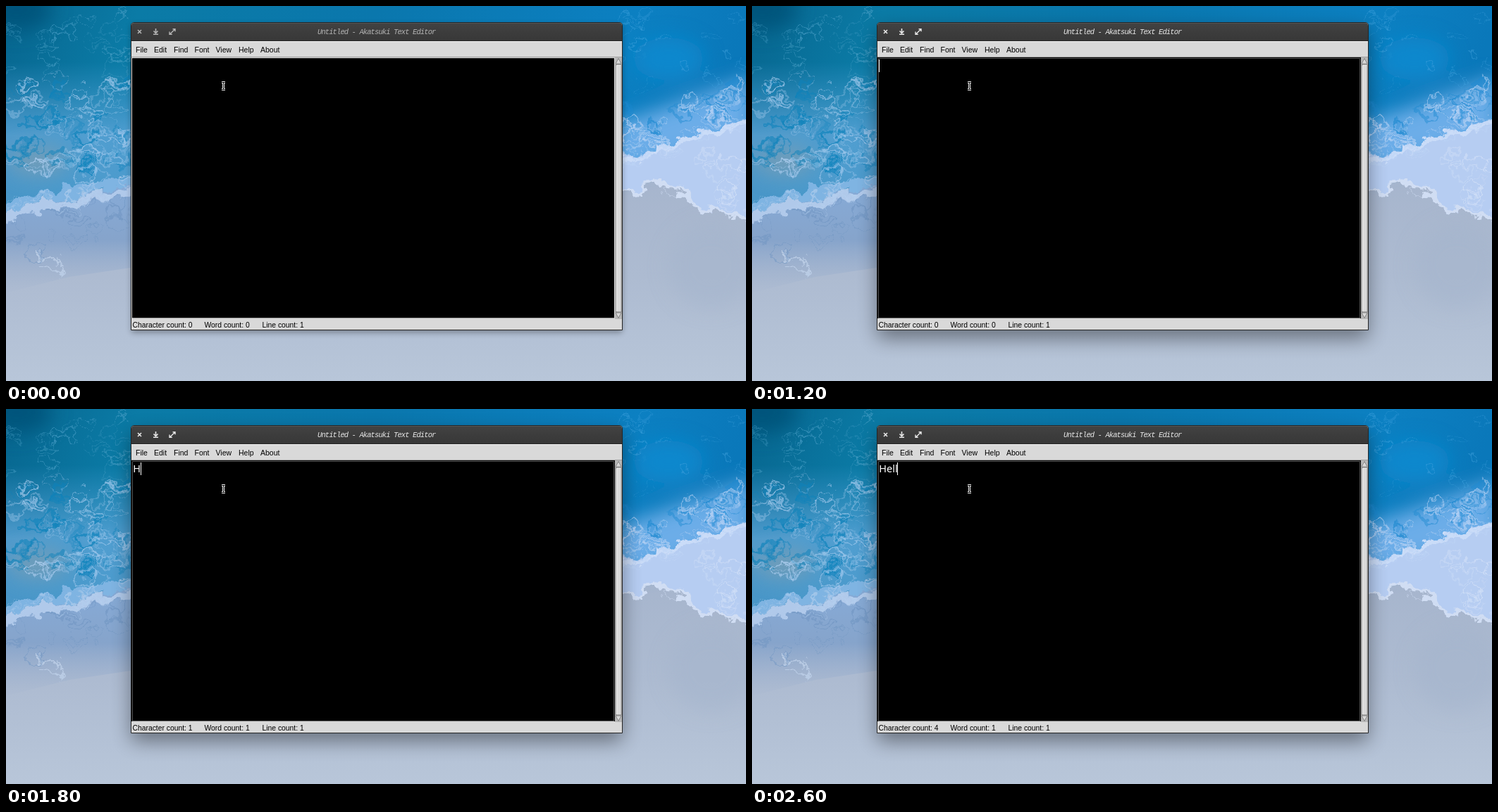
Recreate the animation shown at these times as an HTML page. Size 1050 px wide and 533 px high, loop 8 s.

```html
<!DOCTYPE html>
<html lang="en">
<head>
<meta charset="utf-8">
<title>Text editor</title>
<style>
  html, body { margin: 0; width: 100%; height: 100%; overflow: hidden; }
  svg { position: absolute; inset: 0; width: 100%; height: 100%; }
  .ui { font: 10.5px "Liberation Sans", sans-serif; white-space: pre; }
  #status { font-size: 10.35px; }
  #title { font: italic 10.5px "Liberation Mono", monospace; letter-spacing: -.9px; }
  #typed { font: 14.5px "Noto Sans", sans-serif; fill: #fff; }
  #chrome { --ink: #b4b4b4; --focus: #d9d9d9; --inset: #000; }
  #chrome.active { --ink: #e8e8e8; --focus: #000; --inset: #777; }
  #title { fill: var(--ink); }
  #icons { stroke: var(--ink); fill: none; stroke-width: 1.6; }
  #shadow { opacity: .35; }
  .active #shadow { opacity: .42; }
</style>
</head>
<body>

<!-- Beach seen from above -->
<svg viewBox="0 0 1050 533" preserveAspectRatio="none">
  <defs>
    <linearGradient id="sand" x2="0" y2="1">
      <stop offset=".45" stop-color="#a6b5cd"/>
      <stop offset=".72" stop-color="#adbbd1"/>
      <stop offset="1" stop-color="#b8c6d9"/>
    </linearGradient>
    <linearGradient id="sea" x2="1" y2=".1">
      <stop offset="0" stop-color="#07668f"/>
      <stop offset=".18" stop-color="#0b7ba6"/>
      <stop offset=".5" stop-color="#0a77ad"/>
      <stop offset=".85" stop-color="#0c80c2"/>
      <stop offset="1" stop-color="#0a78ba"/>
    </linearGradient>
    <linearGradient id="wet" x2="0" y2="1">
      <stop offset="0" stop-color="#86abd8"/>
      <stop offset=".5" stop-color="#86a4cb"/>
      <stop offset="1" stop-color="#a5b5cf" stop-opacity="0"/>
    </linearGradient>
    <linearGradient id="surf" x2="0" y2="1">
      <stop offset="0" stop-color="#5ba6e0" stop-opacity="0"/>
      <stop offset=".5" stop-color="#68aade" stop-opacity=".75"/>
      <stop offset="1" stop-color="#6aa9de" stop-opacity=".65"/>
    </linearGradient>
    <filter id="soft" x="-30%" y="-30%" width="160%" height="160%">
      <feGaussianBlur stdDeviation="14"/>
    </filter>
    <filter id="ragged" filterUnits="userSpaceOnUse" x="-40" y="-40" width="1130" height="613"
            color-interpolation-filters="sRGB">
      <feTurbulence type="fractalNoise" baseFrequency=".045" numOctaves="4" seed="4"/>
      <feDisplacementMap in="SourceGraphic" scale="34" xChannelSelector="R" yChannelSelector="G"/>
      <feGaussianBlur stdDeviation=".6"/>
    </filter>
  </defs>
  <rect width="1050" height="533" fill="url(#sand)"/>
  <path d="M-30 280L190 250V370L90 385L-30 415Z" fill="url(#wet)"/>
  <path d="M0 0H1050V170L875 230H178V250L0 288Z" fill="url(#sea)"/>
  <path d="M0 80H178V250L0 288Z" fill="url(#surf)"/>
  <g filter="url(#soft)">
    <ellipse cx="15" cy="5" rx="50" ry="30" fill="#06557c"/>
    <ellipse cx="45" cy="220" rx="42" ry="20" fill="#719db9"/>
    <ellipse cx="940" cy="75" rx="50" ry="30" fill="#1088cd"/>
    <path d="M860 170L1060 100V190L860 240Z" fill="#6cade8"/>
    <ellipse cx="1000" cy="370" rx="60" ry="60" fill="#a3b3cb" opacity=".5"/>
  </g>
  <g filter="url(#ragged)">
    <path d="M860 220L940 195L1065 155V308L1010 296L985 288L937 253L860 270Z" fill="#b6cdf2"/>
    <path d="M870 225Q950 190 1060 163" fill="none" stroke="#cadcf8" stroke-width="7"/>
    <path d="M870 268L937 251L986 287L1060 306" fill="none" stroke="#d0ddf3" stroke-width="5"/>
    <path d="M-20 309Q60 275 190 264" fill="none" stroke="#b0c9ea" stroke-width="12"/>
    <path d="M-20 295Q70 262 190 247" fill="none" stroke="#7fb4e2" stroke-width="12"/>
    <path d="M45 355Q85 360 78 387M48 371Q65 367 78 387" fill="none" stroke="#b9cbe4" stroke-width="2"/>
    <g id="foam" fill="none"/>
  </g>
</svg>

<!-- Editor window -->
<svg id="chrome" viewBox="0 0 1050 533" preserveAspectRatio="none">
  <defs>
    <linearGradient id="bar" x2="0" y2="1">
      <stop stop-color="#424242"/><stop offset="1" stop-color="#373737"/>
    </linearGradient>
    <filter id="blur" filterUnits="userSpaceOnUse" x="100" y="-40" width="860" height="580">
      <feGaussianBlur id="spread" stdDeviation="4"/>
    </filter>
  </defs>
  <g id="shadow" filter="url(#blur)"><rect id="shade" x="178" y="24" width="696" height="437"/></g>
  <path d="M177.500 460.500V28q0-4.500 4.500-4.500H870q4.500 0 4.500 4.500V460.500Z" fill="#d9d9d9" stroke="#252525"/>
  <path d="M178 50V28q0-4 4-4H870q4 0 4 4V50Z" fill="url(#bar)"/>
  <path d="M181 24.500H871" stroke="#555"/>
  <path d="M178 49.500H874" stroke="#282828"/>
  <path d="M178 50.500H874" stroke="#f2f2f2"/>
  <path d="M178 72.500H874" stroke="#a0a0a0"/>
  <g id="icons">
    <path d="M187 34l5 5M192 34l-5 5"/>
    <path d="M212.500 32v6M209.500 35.500l3 3l3-3M209 40.300h7"/>
    <path d="M236.500 32.800H240V36.300M240 32.800L232.500 40M232 36.500V40.200H235.700" stroke-width="1.400"/>
  </g>
  <text id="title" x="442" y="40">Untitled - Akatsuki Text Editor</text>
  <g id="menu" class="ui"></g>

  <rect x="178" y="73" width="686" height="371" style="fill:var(--focus)"/>
  <rect x="179" y="74.500" width="684" height="368.500"/>
  <path d="M179.500 443V74.500H862.500V443" fill="none" style="stroke:var(--inset)" stroke-width=".7"/>
  <path d="M179 443.500H863" stroke="#8c8c8c" stroke-width=".8"/>

  <rect x="864" y="73" width="10" height="372" fill="#b8b8b8"/>
  <g fill="#d9d9d9" stroke="#777" stroke-width=".8">
    <path d="M869 74.500L873 82H865Z"/>
    <path d="M869 443.500L873 436H865Z"/>
    <rect x="865.400" y="83.400" width="7.700" height="351.500"/>
  </g>
  <path d="M866.300 434V84.300H872.500" fill="none" stroke="#fff" stroke-width=".8"/>

  <g id="status" class="ui">
    <text id="chars" x="179.500" y="456.700"></text>
    <text id="words" x="281.500" y="456.700"></text>
    <text x="363.500" y="456.700">Line count: 1</text>
  </g>
  <text id="typed" x="180.300" y="90"></text>
  <rect id="caret" y="76" width="1" height="18" fill="#fff"/>
  <g fill="none">
    <path id="beam" d="M306 108.500H308L308.500 109.500L309 108.500H311M308.500 109.500V117.500M306 118.500H308L308.500 117.500L309 118.500H311"
          stroke-width="3" stroke="#fff"/>
    <path d="M306 108.500H311M308.500 109V118M306 118.500H311" stroke="#000"/>
  </g>
</svg>

<script>
const LOOP = 8000;
const get = id => document.getElementById(id);

function add(parent, tag, attrs, text = "") {
  const el = document.createElementNS(parent.namespaceURI, tag);
  for (const key in attrs) el.setAttribute(key, attrs[key]);
  el.textContent = text;
  parent.append(el);
}

const menu = { File: 184, Edit: 210, Find: 238, Font: 267.5, View: 297.5, Help: 330, About: 361 };
for (const label in menu) add(get("menu"), "text", { x: menu[label], y: 65.5 }, label);

// Foam lace: loose rings, made ragged by the displacement filter
let seed = 7;
const random = () => (seed = seed * 16807 % 2147483647) / 2147483647;
function lace(count, x, y, width, height, slope, color, weight) {
  for (let i = 0; i < count; i++) {
    const dx = random() * width;
    add(get("foam"), "ellipse", {
      cx: x + dx, cy: y + random() * height + dx * slope,
      rx: 5 + random() * 12, ry: 3 + random() * 8,
      stroke: color, "stroke-width": weight * (.4 + random()), opacity: .25 + random() * .4
    });
  }
}
lace(20, 0, 10, 180, 90, 0, "#4a9fc6", 1.5);
lace(26, 0, 105, 180, 130, 0, "#0c82bb", 4);
lace(50, 0, 105, 180, 140, 0, "#b0d0f2", 2.2);
lace(16, 0, 275, 180, 30, -.2, "#b4cfee", 2);
lace(16, 0, 300, 180, 60, -.2, "#7095c2", 2);
lace(16, 870, 10, 180, 110, 0, "#3d9fdb", 1.5);
lace(14, 870, 150, 180, 50, -.3, "#1c89d0", 4);
lace(36, 870, 165, 180, 65, -.3, "#bcd4f5", 2.4);
lace(14, 940, 200, 110, 75, .1, "#d3e1f8", 2);

// The counter follows each typed letter one step later
const steps = [
  { at: 0, text: "", count: 0 },
  { at: 400, text: "", count: 0, caret: true },
  { at: 900, text: "", count: 0 },
  { at: 1200, text: "", count: 0, caret: true },
  { at: 1700, text: "H", count: 0, caret: true },
  { at: 1800, text: "H", count: 1, caret: true },
  { at: 2100, text: "He", count: 1, caret: true },
  { at: 2200, text: "He", count: 2, caret: true },
  { at: 2300, text: "Hel", count: 2, caret: true },
  { at: 2400, text: "Hel", count: 3, caret: true },
  { at: 2500, text: "Hell", count: 3, caret: true },
  { at: 2600, text: "Hell", count: 4, caret: true }
];

function show({ at, text, count, caret }) {
  const active = at > 0;
  get("chrome").classList.toggle("active", active);
  get("spread").setAttribute("stdDeviation", active ? 14 : 4);
  get("shade").setAttribute("y", active ? 35 : 27);
  get("typed").textContent = text;
  get("caret").setAttribute("x", Math.round(180 + get("typed").getComputedTextLength()));
  get("caret").setAttribute("visibility", caret ? "visible" : "hidden");
  get("chars").textContent = `Character count: ${count}`;
  get("words").textContent = `Word count: ${Math.min(count, 1)}`;
}

const start = performance.now();
let current;
function frame() {
  const time = (performance.now() - start) % LOOP;
  const step = steps.findLast(s => s.at <= time);
  if (step !== current) show(current = step);
  requestAnimationFrame(frame);
}
frame();
</script>
</body>
</html>
```
